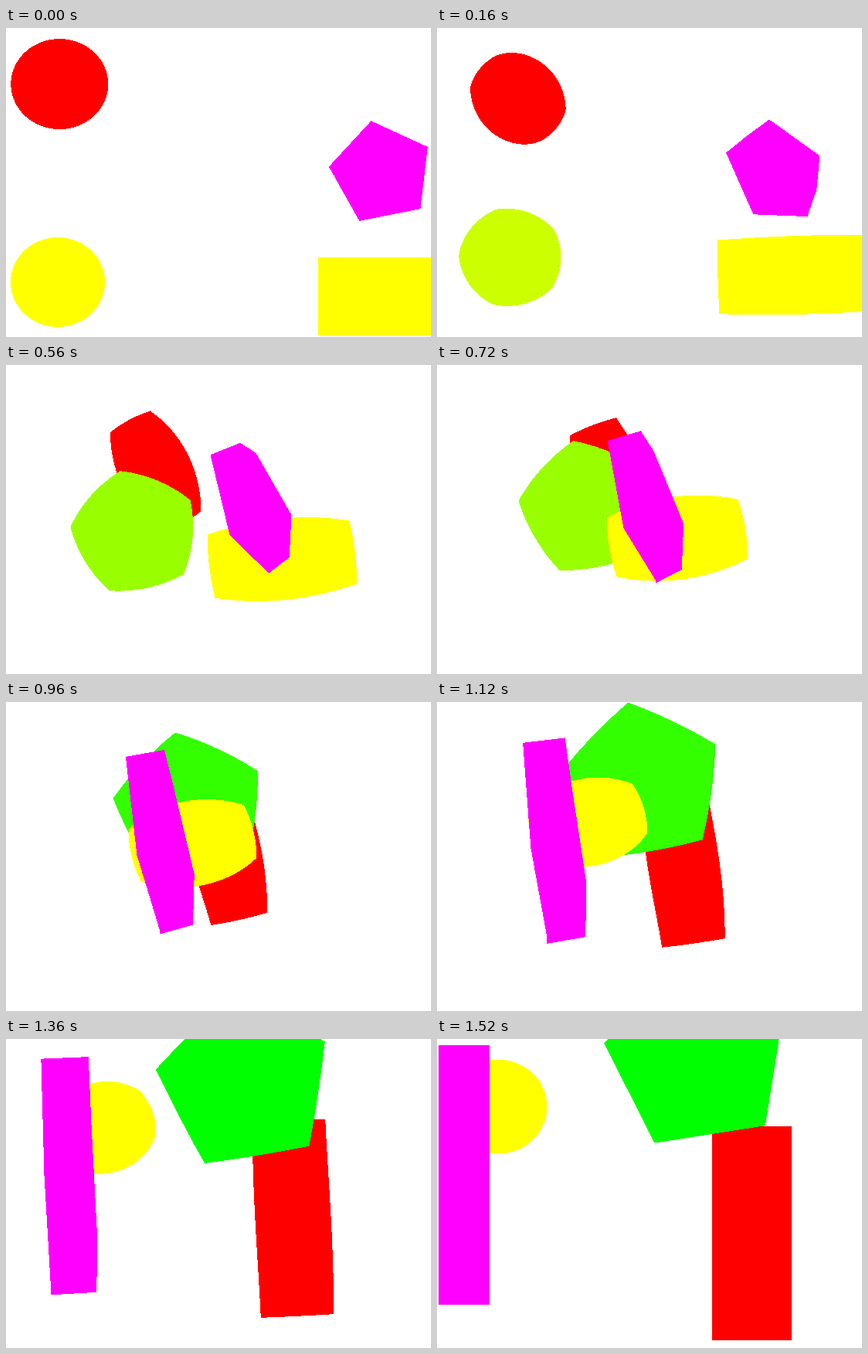
Animation, 550 px wide and 400 px high, one loop 1600 ms. Source, as an HTML page:

```html
<!DOCTYPE html>
<html lang="en">
<head>
<meta charset="utf-8">
<title>Shape morph</title>
<style>
  html, body { margin: 0; width: 100%; height: 100%; overflow: hidden; background: #fff; }
  svg { display: block; }
</style>
</head>
<body>
<!-- The small offset sets which pixels the hard, unsmoothed edges cover. -->
<svg width="550" height="400" shape-rendering="crispEdges">
  <g id="stage" transform="translate(-0.45 -0.45)"></g>
</svg>
<script>
const STEP_MS = 80;
const STEPS = 20;
const SAMPLES = 96;

const mix = (a, b, t) => a + (b - a) * t;
const mixPoint = (a, b, t) => [mix(a[0], b[0], t), mix(a[1], b[1], t)];

// An outline has a point for every fraction of its perimeter, and the fractions of its corners.
function ellipse(cx, cy, rx, ry) {
  const pointAt = p => {
    const angle = Math.PI * (1 + 2 * p);
    return [cx + rx * Math.cos(angle), cy + ry * Math.sin(angle)];
  };
  return { corners: [], pointAt };
}

function polygon(points) {
  const next = i => points[(i + 1) % points.length];
  const lengths = points.map(([x, y], i) => Math.hypot(next(i)[0] - x, next(i)[1] - y));
  const perimeter = lengths.reduce((sum, length) => sum + length, 0);
  let walked = 0;
  const corners = lengths.map(length => {
    const corner = walked / perimeter;
    walked += length;
    return corner;
  });
  const pointAt = p => {
    const i = corners.findLastIndex(corner => corner <= p);
    return mixPoint(points[i], next(i), (p - corners[i]) * perimeter / lengths[i]);
  };
  return { corners, pointAt };
}

const box = (left, top, right, bottom) =>
  polygon([[left, top], [right, top], [right, bottom], [left, bottom]]);

const pentagon = (cx, cy, radius, degrees) => polygon(Array.from({ length: 5 }, (_, i) => {
  const angle = (degrees + 72 * i) * Math.PI / 180;
  return [cx + radius * Math.cos(angle), cy + radius * Math.sin(angle)];
}));

// Yellow turns green through five hard tones.
const limeTones = [255, 204, 153, 51, 0];
const lime = t => `rgb(${limeTones[Math.ceil(4 * t)]}, 255, 0)`;

function morph(color, from, to) {
  const path = document.createElementNS('http://www.w3.org/2000/svg', 'path');
  document.getElementById('stage').append(path);

  const even = Array.from({ length: SAMPLES }, (_, i) => i / SAMPLES);
  const pairs = [...even, ...from.corners, ...to.corners]
    .sort((a, b) => a - b)
    .map(p => [from.pointAt(p), to.pointAt(p)]);

  return t => {
    path.setAttribute('d', `M${pairs.map(([a, b]) => mixPoint(a, b, t)).join('L')}Z`);
    path.setAttribute('fill', color(t));
  };
}

const morphs = [
  morph(() => '#f00', ellipse(69.75, 73, 63, 58.5), box(356, 113, 459, 390)),
  morph(lime, ellipse(67.5, 329.5, 61, 58), pentagon(338.2, 25.3, 123.3, 189.1)),
  morph(() => '#ff0', box(404, 297, 636.5, 398), ellipse(79.5, 88, 63.5, 61)),
  morph(() => '#f0f', pentagon(486.4, 188, 68.6, 186.7), box(2, 8, 68, 344))
];

function render() {
  const step = Math.floor(performance.now() / STEP_MS) % STEPS;
  morphs.forEach(draw => draw(step / (STEPS - 1)));
  requestAnimationFrame(render);
}

render();
</script>
</body>
</html>
```
